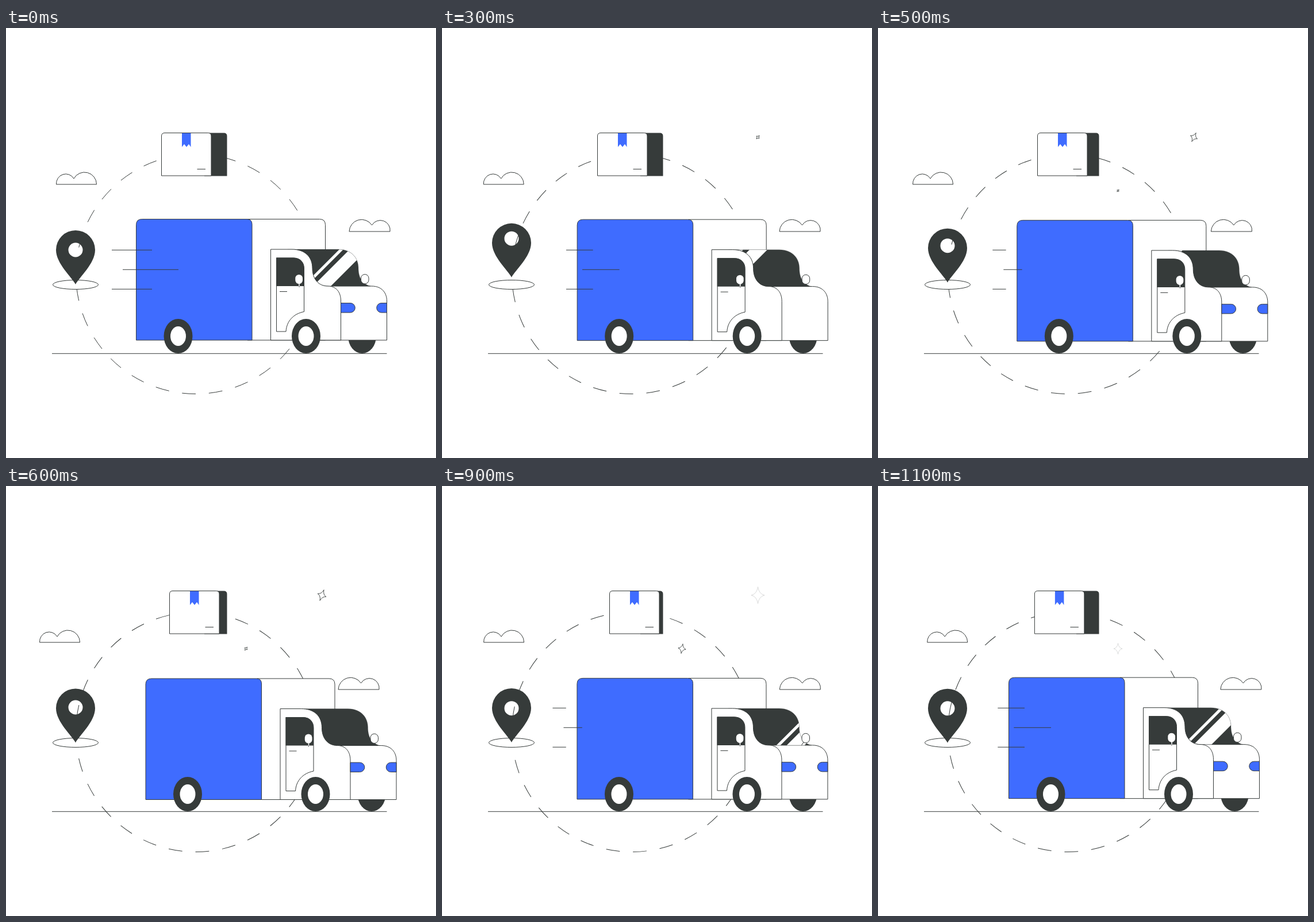
These frames come from a looping animation (748x748 px, 1200 ms). An HTML page:

```html
<!DOCTYPE html>
<html lang="en">
<head>
<meta charset="utf-8">
<title>Delivery truck</title>
<style>
  html, body { margin: 0; width: 100%; height: 100%; overflow: hidden; background: #fff; }
  svg { display: block; width: 100vw; height: 100vh; }
  .line { fill: none; stroke: #363b3a; }
  .card { fill: #fff; stroke: #363b3a; }
  .dark { fill: #363b3a; }
  .blue { fill: #3f6cff; }
  .white { fill: #fff; }
</style>
</head>
<body>
<svg viewBox="0 0 748 748">
  <defs>
    <path id="glass" d="M490 385H578C603 385 613 402 613 417C613 432 618 445 634 449H560C543 449 520 435 520 415Z"/>
    <clipPath id="glassClip"><use href="#glass"/></clipPath>
    <g id="wheel">
      <ellipse class="dark" rx="25" ry="30"/>
      <ellipse class="white" rx="13.5" ry="17"/>
    </g>
    <path id="star" d="M0-14.5Q2-2 11.5 0Q2 2 0 14.5Q-2 2-11.5 0Q-2-2 0-14.5Z"
      class="line" stroke-width=".9" vector-effect="non-scaling-stroke"/>
  </defs>

  <circle id="ring" class="line" cx="330" cy="428" r="208.5" pathLength="56" stroke-dasharray="1.02 .98"/>
  <path id="cloudL" class="card" d="M87.5 272A16.5 17 0 0 1 118 262A21 21 0 0 1 157.5 272Z"/>
  <path id="cloudR" class="card" d="M597 354A21.5 21.5 0 0 1 636.5 343A17 17 0 0 1 668 354Z"/>
  <use id="starA" href="#star"/>
  <use id="starB" href="#star"/>

  <path class="dark" d="M345 182.5H379Q384.5 182.5 384.5 188V257.5H345Z"/>
  <g id="box">
    <path class="card" d="M270.5 257V188Q270.5 182.5 276 182.5H351.500Q357 182.500 357 188V257Z"/>
    <path class="blue" d="M306 183H321.500V207L318 202L314 207L310 202L306 207Z"/>
    <path class="line" d="M332.500 245.500H347"/>
  </g>

  <ellipse class="card" cx="121" cy="446.500" rx="39.500" ry="8"/>
  <path id="pin" class="dark" fill-rule="evenodd"/>

  <path class="line" d="M80 566.300H662.500"/>
  <g id="rearWheel"><ellipse class="dark" cx="619.500" cy="536" rx="24.500" ry="30"/></g>
  <g id="truck">
    <path class="card" d="M420 332.500H545.500Q555.500 332.500 555.500 342.500V543H420Z"/>
    <path class="card blue" style="fill:#3f6cff" d="M226.500 543V342.500Q226.500 332.500 236.500 332.500H419Q428 332.500 428 341.500V543Z"/>
    <path class="card" d="M540 449H636C655 449 662.500 462 662.500 475V543H540Z"/>
    <use href="#glass" class="dark"/>
    <g clip-path="url(#glassClip)">
      <path id="shine" class="white" d="M590 380h7l-75 75h-7zM608 380h31l-75 75h-31z"/>
    </g>
    <use href="#glass" class="line" stroke-width=".5" opacity=".5"/>
    <path class="card" d="M460.500 543V385H497C520 385 533 398 533 418C533 436 543 449 560 449C574 449 582.500 459 582.500 475V543Z"/>
    <path class="card" d="M470.500 528V400H500C512 400 518.500 408 518.500 418V493.500C500 497 488 510 487 528Z"/>
    <path class="dark" d="M470 449V399.500H500C512 399.500 518.500 408 518.500 418V449Z"/>
    <path class="line" d="M476 458.500H489M510 444V451"/>
    <path d="M510 440V449" stroke="#fff" stroke-width="1.500"/>
    <rect class="white" x="503.300" y="429" width="12.700" height="16" rx="6.300"/>
    <path class="line" d="M621 443L617 449"/>
    <rect class="card" x="617.500" y="428.500" width="13.500" height="16.500" rx="6.700"/>
    <g id="lamps" style="fill:#3f6cff" stroke="#363b3a">
      <path d="M582.500 478.500H599A8.200 8.200 0 0 1 599 495H582.500Z"/>
      <path d="M662.500 478.500H653A8.200 8.200 0 0 0 653 495H662.500Z"/>
    </g>
  </g>
  <g id="wheels">
    <use href="#wheel" x="299.500" y="536"/>
    <use href="#wheel" x="522" y="536"/>
  </g>
  <path id="speed" class="line" stroke-width="1.100"/>
</svg>
<script>
const LOOP = 1200;
const el = id => document.getElementById(id);
const set = (id, name, value) => el(id).setAttribute(name, value);
const move = (id, x, y = 0) => set(id, 'transform', `translate(${x} ${y})`);

// Smooth closed curve through evenly spaced keys.
function curve(keys, t) {
  const n = keys.length, pos = t / LOOP * n, i = Math.floor(pos), u = pos - i;
  const [a, b, c, d] = [-1, 0, 1, 2].map(k => keys[(i + k + n) % n]);
  return b + u / 2 * (c - a + u * (2 * a - 5 * b + 4 * c - d + u * (3 * (b - c) + d - a)));
}

function drawStar(id, x, y, size, age) {
  const grow = Math.min(1, Math.max(0, age / 640));
  const fade = Math.min(1, Math.max(0, 1 - (age - 560) / 267));
  const turn = 55 * Math.max(0, 1 - age / 700);
  set(id, 'transform', `translate(${x} ${y}) rotate(${turn}) scale(${size * grow})`);
  set(id, 'opacity', age > 0 ? fade : 0);
}

function drawPin(t) {
  const y = curve([0, -8.5, -12, .5, 0, 0], t);
  const hole = 386 + curve([0, -12, -20.5, -1, 2, 0], t);
  set('pin', 'd', `M121 ${446 + y}c-6-12-34-36-34-60a34 34 0 0 1 68 0c0 24-28 48-34 60z
    M108.5 ${hole}a12.5 12.5 0 0 1 25 0a12.5 12.5 0 0 1-25 0z`);
}

function drawSpeed(t, x) {
  const p = t % 400 / 200;
  const from = p < 1 ? 0 : 2 - p, to = p < 1 ? 1 - p : 1;
  const lines = [[184, 70, 386.3], [203, 97, 420.3], [184, 70, 454.3]];
  set('speed', 'd', to > from ? lines.map(([left, len, y]) =>
    `M${left + x + len * from} ${y}H${left + x + len * to}`).join('') : '');
}

function draw(t) {
  const sway = curve([0, .228, .674, 1, .88, .33], t);
  const x = 16.5 * sway;
  const bounce = 1.25 * (1 - Math.cos(t * Math.PI / 200));
  move('truck', x, bounce);
  move('wheels', x);
  move('rearWheel', x);
  move('cloudL', -29 * sway);
  move('cloudR', -19 * sway);
  move('box', t < 400 ? 0 : 14 * (1 - Math.cos((t - 400) * Math.PI / 400)));
  move('shine', -5 - .215 * ((t + 600) % LOOP - 600));
  set('lamps', 'opacity', t < 150 || t > 500 ? 1 : 0);
  set('ring', 'transform', `rotate(${t * .075} 330 428)`);
  drawPin(t);
  drawSpeed(t, x);
  drawStar('starA', 549.5, 190, 1, t - 160);
  drawStar('starB', 417.5, 283, .65, t - 360);
}

// Shown every 100 ms, sampled from a 15 fps timeline.
function tick() {
  const step = Math.floor(performance.now() % LOOP / 100);
  draw(Math.ceil(step * 1.5) * 200 / 3);
  requestAnimationFrame(tick);
}
tick();
</script>
</body>
</html>
```
